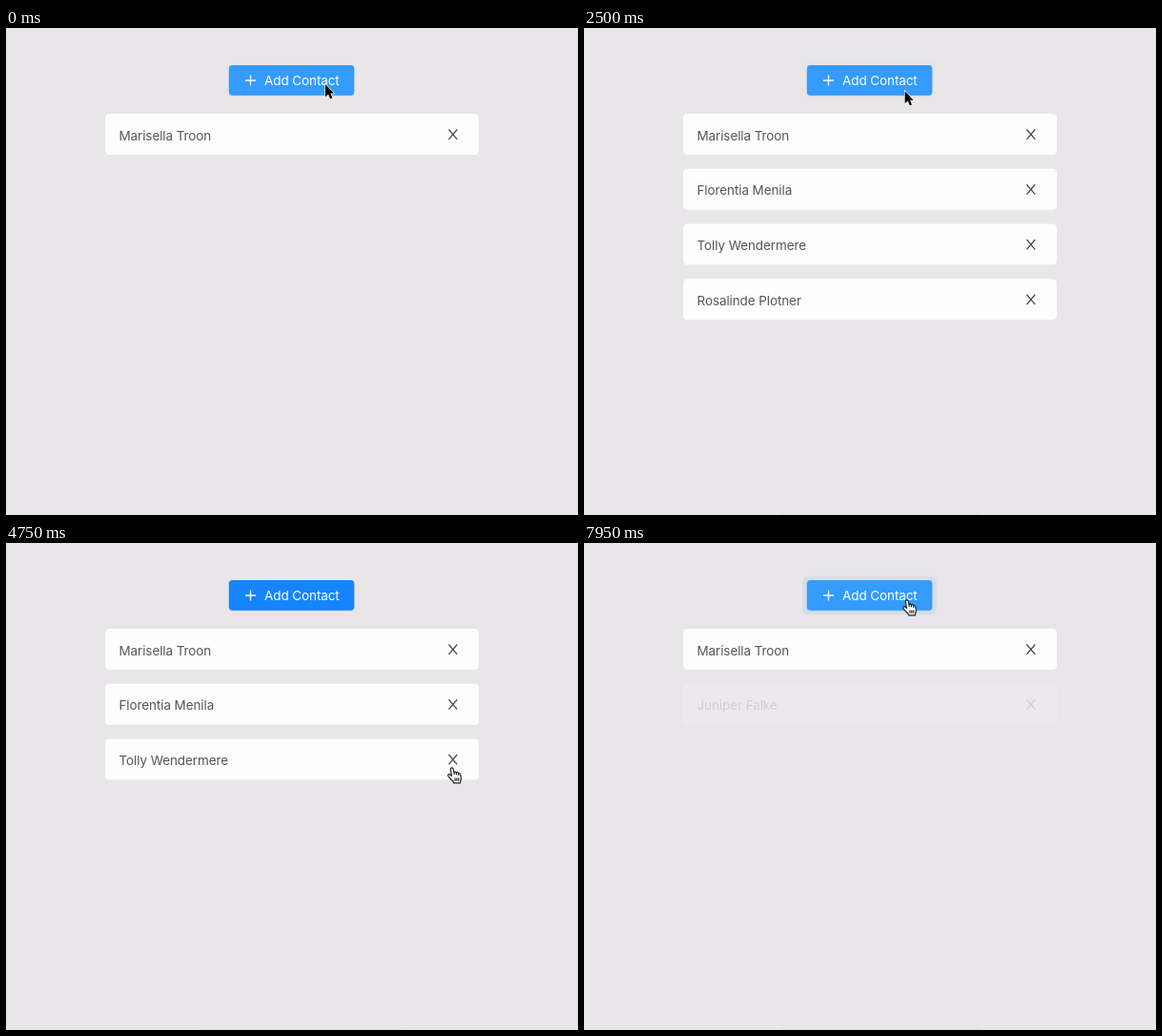
An HTML page for the animation above (8 s loop, 600x511 px).

```html
<!DOCTYPE html>
<html lang="en">
<head>
<meta charset="utf-8">
<title>Contact list</title>
<style>
  html, body { margin: 0; width: 100%; height: 100%; overflow: hidden; background: #e8e6e8; }
  svg { display: block; width: 100%; height: 100%; }
  text { font: 13.5px Inter, "Open Sans", sans-serif; letter-spacing: -0.1px; fill: #555; }
  .label { fill: #fff; }
  .icon { fill: none; stroke: #484848; stroke-width: 1.25; }
  .plus { stroke: #fff; stroke-width: 1.3; }
</style>
</head>
<body>
<svg viewBox="0 0 600 511">
  <rect width="600" height="511" fill="#e8e6e8"/>
  <rect x="206" y="510" width="210" height="1" fill="#dedcde"/>
  <rect id="wave" fill="#1890ff"/>
  <rect x="233.8" y="41" width="131.5" height="31" rx="4" fill="#000" opacity=".04"/>
  <rect id="button" x="233.8" y="39.1" width="131.5" height="31.6" rx="3.6"/>
  <path class="icon plus" d="M251 55h11M256.5 49.5v11"/>
  <text class="label" x="271" y="60">Add Contact</text>
  <g id="list"></g>
  <g id="cursor">
    <path id="arrow" transform="scale(.92)" d="M0 0V14.3L3.3 11.3 5.6 16.5 8 15.5 5.8 10.4H9.8Z" fill="#000" stroke="#fff" stroke-width="1.4" paint-order="stroke"/>
    <g id="hand" transform="translate(-4.4 -1) scale(1.05)" stroke="#222" stroke-width="1.1" stroke-linejoin="round">
      <path fill="#fff" d="M4.6 9L3.6 2.6Q3.4.9 4.7.8 6 .7 6.3 2.2L7 5.4Q8 4.4 9.2 5.4 10.4 4.8 11.3 6 12.8 5.6 13.3 7.2L14 10Q14.4 12 13.4 14L13.2 16H6.6L6.4 14.8Q3.4 12 1.4 9.4.4 7.6 2 7.2 3.2 7.2 4.6 9Z"/>
      <path fill="none" d="M7 5.4l.4 2.4M9.2 5.6l.3 2.4M11.3 6.2l.3 2.2M8 11v3M9.8 11v3M11.6 11v3"/>
    </g>
  </g>
</svg>
<script>
const LOOP = 8000, PITCH = 57.75, FADE = 500;
const $ = id => document.getElementById(id);
const clamp = v => Math.min(1, Math.max(0, v));

// name, row, time shown, time removed
const contacts = [
  ["Marisella Troon", 0, -FADE, Infinity],
  ["Florentia Menila", 1, 300, 5980],
  ["Tolly Wendermere", 2, 1180, 5120],
  ["Rosalinde Plotner", 3, 1900, 4000],
  ["Juniper Falke", 1, 7785, Infinity]
];
const clicks = [300, 1180, 1900, 7785];
const BLUR = 4000, HOVER = 7020;

// time, x, y
const path = [
  [0, 335, 59], [2400, 335, 59], [2500, 336.5, 66], [2950, 398, 158],
  [3350, 433.5, 240], [3750, 467, 290], [4300, 467, 290], [4700, 467, 236],
  [5400, 467, 236], [5750, 467, 178], [6480, 467, 178], [6700, 433.5, 149],
  [7150, 338, 60], [LOOP, 338, 60]
];

$("list").innerHTML = contacts.map(([name, row]) => `
  <g transform="translate(0 ${row * PITCH})">
    <rect x="104" y="90" width="392" height="43" rx="4.5" fill="#fefdfe"/>
    <text x="118.5" y="117.5">${name}</text>
    <path class="icon" d="M464.4 106.5L473.2 116.8M473.2 106.5L464.4 116.8"/>
  </g>`).join("");
const cards = [...$("list").children];

const easeIn = v => clamp(v) ** 1.67;
const easeOut = v => 1 - (1 - clamp(v)) ** 5;

function slope(i, axis) {
  const a = path[i - 1], b = path[i], c = path[i + 1];
  if (!a || !c) return 0;
  if ((b[axis] - a[axis]) * (c[axis] - b[axis]) === 0) return 0;
  return (c[axis] - a[axis]) / (c[0] - a[0]);
}

function along(t, axis) {
  let i = 0;
  while (i < path.length - 2 && t >= path[i + 1][0]) i++;
  const a = path[i], b = path[i + 1], d = b[0] - a[0], u = (t - a[0]) / d;
  const s = u * u * (3 - 2 * u);
  return a[axis] + (b[axis] - a[axis]) * s
    + d * u * (1 - u) * ((1 - u) * slope(i, axis) - u * slope(i + 1, axis));
}

function drawWave(t) {
  const start = clicks.filter(c => c <= t).pop();
  const age = start === undefined ? Infinity : t - start;
  const r = 5 * easeOut(age / 400);
  const box = { x: 233.8 - r, y: 39.1 - r, width: 131.5 + 2 * r, height: 31.6 + 2 * r, rx: 3.6 + r / 2 };
  for (const k in box) $("wave").setAttribute(k, box[k]);
  $("wave").setAttribute("opacity", 0.2 * (1 - easeOut(age / 1200)));
}

function draw(t) {
  contacts.forEach(([, , show, hide], i) => {
    const shown = t < hide ? easeIn((t - show) / FADE) : 1 - easeIn((t - hide) / FADE);
    cards[i].setAttribute("opacity", shown);
  });

  const light = t < HOVER ? 1 - clamp((t - BLUR) / 300) : clamp((t - HOVER) / 300);
  const mix = (a, b) => Math.round(a + (b - a) * light);
  $("button").setAttribute("fill", `rgb(${mix(22, 52)},${mix(132, 155)},255)`);
  drawWave(t);

  const x = along(t, 1), y = along(t, 2);
  const rowY = (y - 90) % PITCH;
  const overClose = y > 90 && Math.abs(x - 468.5) < 9 && rowY > 12 && rowY < 32;
  const pointing = overClose || t > HOVER;
  $("cursor").setAttribute("transform", `translate(${x} ${y})`);
  $("arrow").setAttribute("visibility", pointing ? "hidden" : "visible");
  $("hand").setAttribute("visibility", pointing ? "visible" : "hidden");
}

const origin = performance.now();
function tick() {
  draw((performance.now() - origin) % LOOP);
  requestAnimationFrame(tick);
}
tick();
</script>
</body>
</html>
```
